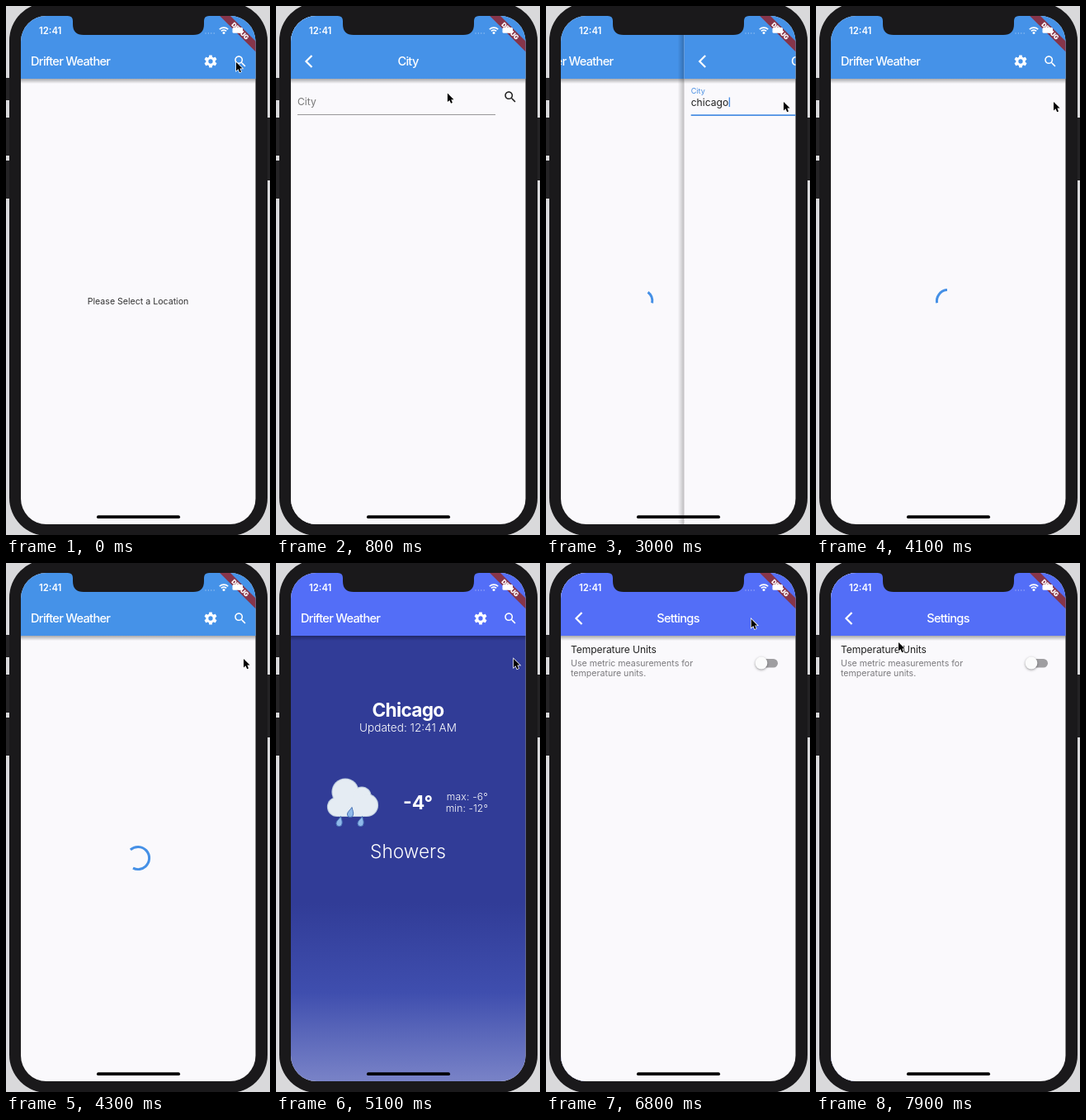
These frames come from a looping animation (320x640 px, 8000 ms). An HTML page with a canvas:

```html
<!DOCTYPE html>
<html lang="en">
<head>
<meta charset="utf-8">
<title>Weather app</title>
<style>
html, body { margin: 0; width: 100%; height: 100%; overflow: hidden; background: #d9d9db; }
canvas { display: block; width: 320px; height: 640px; }
</style>
</head>
<body>
<canvas id="stage" width="320" height="640"></canvas>
<script>
const c = document.getElementById('stage').getContext('2d');
const LOOP = 8000, STEP = 100, W = 284, TAU = Math.PI * 2;
const BODY = '#1a191b', PAPER = '#faf9fc', BLUE = [69, 146, 232], INDIGO = [83, 110, 247];
const LOADED = 4600, LOADING = 2867, FOCUS = 1000;
const TYPED = [1200, 1300, 1450, 1600, 1700, 1800, 2000];
// Pointer stops: time, x, y
const POINTER = [
  [0, 279, 68], [400, 279, 68], [950, 192, 114], [2150, 192, 114], [2600, 288, 116],
  [5300, 288, 116], [6000, 253, 67], [6700, 253, 67], [7700, 100, 96], [LOOP, 100, 96]
];
const SEARCH = new Path2D('M15.5 14h-.79l-.28-.27C15.41 12.59 16 11.11 16 9.5 16 5.91 13.09 3 9.5 3S3 5.91 3 9.5 5.91 16 9.5 16c1.61 0 3.09-.59 4.23-1.57l.27.28v.79l5 4.99L20.49 19l-4.99-5zm-6 0C7.01 14 5 11.99 5 9.5S7.01 5 9.5 5 14 7.01 14 9.5 11.99 14 9.5 14z');
const ARROW = new Path2D('M0 0V10.5L2.5 8.3 4.2 12.2 6 11.4 4.4 7.6H7.6Z');
const NOTCH = new Path2D('M75 11H246V12Q240 12 240 18V22Q240 35 227 35H94Q81 35 81 22V18Q81 12 75 12Z');
const DROP = new Path2D('M2 -6.5C3 -2 4 -1 3.6 2A3.6 3.6 0 0 1 -3.6 2C-3.5 -1 0 -3 2 -6.5Z');

const clamp = v => Math.max(0, Math.min(1, v));
const mix = (a, b, k) => a + (b - a) * k;

function bezier(x1, y1, x2, y2) {
  const at = (a, b, s) => 3 * a * s * (1 - s) ** 2 + 3 * b * s * s * (1 - s) + s ** 3;
  return x => {
    x = clamp(x);
    let lo = 0, hi = 1;
    for (let i = 0; i < 24; i++) {
      const mid = (lo + hi) / 2;
      if (at(x1, x2, mid) < x) lo = mid; else hi = mid;
    }
    return at(y1, y2, hi);
  };
}
const slideEase = bezier(.35, .91, .33, .97);
const strokeEase = bezier(.4, 0, .2, 1);
const slide = (t, start) => t < start ? 0 : slideEase((t - start) / 340);

function at(x, y, draw, turn = 0, scale = 1) {
  c.save();
  c.translate(x, y);
  c.rotate(turn);
  c.scale(scale, scale);
  draw();
  c.restore();
}

function rect(x, y, w, h, fill, r = 0) {
  c.fillStyle = fill;
  c.beginPath();
  c.roundRect(x, y, w, h, r);
  c.fill();
}

function disc(x, y, r, fill) {
  c.fillStyle = fill;
  c.beginPath();
  c.arc(x, y, r, 0, TAU);
  c.fill();
}

function arc(x, y, r, from, to, width, color) {
  c.strokeStyle = color;
  c.lineWidth = width;
  c.beginPath();
  c.arc(x, y, r, from, to);
  c.stroke();
}

function text(s, x, y, size, color, weight = 400, spacing = 0, align = 'left') {
  c.font = `${weight} ${size}px Inter, "Liberation Sans", sans-serif`;
  c.letterSpacing = spacing + 'px';
  c.textAlign = align;
  c.fillStyle = color;
  c.fillText(s, x, y);
}

function fade(x0, y0, x1, y1, ...stops) {
  const g = c.createLinearGradient(x0, y0, x1, y1);
  stops.forEach(([p, color]) => g.addColorStop(p, color));
  return g;
}

function searchIcon(x, y, color) {
  c.fillStyle = color;
  at(x - 9, y - 9, () => c.fill(SEARCH), 0, .757);
}

function gear(x, y) {
  arc(x, y, 4.2, 0, TAU, 3.1, '#fff');
  for (let i = 0; i < 6; i++)
    at(x, y, () => rect(-1.9, -7.6, 3.8, 3, '#fff', .6), i * TAU / 6);
}

function appBar(color) {
  rect(18, 88, W + 1, 6, fade(0, 88, 0, 94, [0, 'rgba(0,0,0,.32)'], [1, 'rgba(0,0,0,0)']));
  rect(18, 0, W + 1, 88, color);
}

function subPage(title, color) {
  rect(10, 0, 8, 640, fade(10, 0, 18, 0, [0, 'rgba(0,0,0,0)'], [1, 'rgba(0,0,0,.25)']));
  rect(18, 0, W + 1, 640, PAPER);
  appBar(color);
  c.strokeStyle = '#fff';
  c.lineWidth = 2.2;
  c.beginPath();
  c.moveTo(43.5, 60);
  c.lineTo(36.5, 67);
  c.lineTo(43.5, 74);
  c.stroke();
  text(title, 160, 72, 14.6, '#fff', 500, -.7, 'center');
}

function spinner(t) {
  const ms = (t - LOADING) * 1.24, cycle = ms / 1333 % 1;
  const head = strokeEase(cycle * 2) * .75, tail = strokeEase(cycle * 2 - 1) * .75;
  const start = (-.25 + tail + ms / 2222 + cycle / 4) * TAU;
  arc(160, 357, 13.6, start, start + Math.max(head - tail, .001) * TAU, 3, '#4590e6');
}

function cloud() {
  const puffs = [[84, 277, 16], [104, 282, 11], [74, 295, 11.5], [110, 293, 13.5]];
  for (const [grow, color] of [[.6, '#bccbdd'], [-.5, '#e5ecf3']]) {
    for (const [x, y, r] of puffs) disc(x, y, r + grow, color);
    rect(74, 284, 36, 22.5 + grow, color);
  }
  c.lineWidth = 1;
  c.strokeStyle = '#4a73b5';
  c.fillStyle = '#8fb9ea';
  for (const [x, y] of [[90, 302], [76.5, 313], [102.5, 313]])
    at(x, y, () => { c.fill(DROP); c.stroke(DROP); });
}

function weather() {
  rect(18, 88, W + 1, 552, fade(0, 88, 0, 627,
    [0, '#313c97'], [.6, '#313c97'], [.8, '#3f4eae'], [1, '#7983c7']));
  text('Chicago', 160, 186, 22.7, '#fff', 700, -.7, 'center');
  text('Updated: 12:41 AM', 160, 203.5, 13.6, '#fff', 300, 0, 'center');
  cloud();
  text('-4°', 154, 298, 23, '#fff', 700);
  text('max: -6°', 257, 287, 12.1, '#fff', 300, .2, 'right');
  text('min: -12°', 257, 301, 12.1, '#fff', 300, .1, 'right');
  text('Showers', 160, 357, 22.7, '#fff', 300, 0, 'center');
}

function home(t, color) {
  rect(18, 0, W + 1, 640, PAPER);
  if (t >= LOADED) weather();
  else if (t >= LOADING) spinner(t);
  else text('Please Select a Location', 160, 361, 10.6, '#333', 400, 0, 'center');
  appBar(color);
  text('Drifter Weather', 30, 72, 14.6, '#fff', 500, -.7);
  gear(248, 67);
  searchIcon(284, 67, '#fff');
}

function cityPage(t, color) {
  subPage('City', color);
  const k = clamp((t - FOCUS) / 160), on = k > 0;
  const accent = on ? '#4a8fe3' : '#777';
  text('City', 26, mix(120, 106, k), mix(12.1, 9.1, k), accent);
  const word = 'chicago'.slice(0, TYPED.filter(ms => ms <= t).length);
  text(word, 26, 120.5, 12.1, '#222');
  const idle = t - TYPED[6];
  if (on && (idle < 0 || idle % 1000 < 500))
    rect(26.5 + c.measureText(word).width, 110.5, 1.4, 11.5, '#4a8fe3');
  rect(26, 131.3, 240, on ? 1.6 : .8, accent);
  searchIcon(284, 110, '#222');
}

function settingsPage(color) {
  subPage('Settings', color);
  text('Temperature Units', 30, 109, 12.1, '#222', 400, -.1);
  text('Use metric measurements for', 30, 124.5, 10.6, '#7b7a7d');
  text('temperature units.', 30, 137, 10.6, '#7b7a7d');
  rect(256, 116, 25, 10.5, '#9f9ea1', 5.25);
  c.shadowColor = 'rgba(0,0,0,.4)';
  c.shadowBlur = 3;
  c.shadowOffsetY = 1;
  disc(261, 121, 7.4, '#fbfbfb');
  c.shadowColor = 'transparent';
}

function statusBar() {
  at(302, 12, () => {
    rect(-45, 21.2, 90, 9.1, '#86354a');
    text('DEBUG', 0, 28.5, 7.7, '#fff', 900, -.2, 'center');
  }, Math.PI / 4);
  text('12:41', 40, 33.7, 11.3, '#fff', 600, 0);
  for (let i = 0; i < 4; i++) disc(242 + i * 3.4, 33, .7, 'rgba(255,255,255,.45)');
  for (const r of [4.4, 7.4]) arc(264, 33.5, r, -TAU * 3 / 8, -TAU / 8, 1.7, '#fff');
  disc(264, 32.5, 1.5, '#fff');
  rect(274.5, 26, 12.5, 6.8, '#fff', 1.5);
  rect(110, 616.3, 101, 3.8, '#000', 2);
}

function phone() {
  rect(0, 0, 320, 640, '#d9d9db');
  for (const [y, h] of [[87, 27], [135, 46], [187, 46]]) rect(-3, y, 9, h, '#242325', 2);
  rect(315, 135, 9, 76, '#242325', 2);
  rect(4, -4, 313, 645, BODY, 46);
}

function pointer(t) {
  const i = POINTER.findIndex(p => p[0] > t);
  const [t0, x0, y0] = POINTER[i - 1], [t1, x1, y1] = POINTER[i];
  const u = (t - t0) / (t1 - t0), k = u * u * (3 - 2 * u);
  at(mix(x0, x1, k), mix(y0, y1, k), () => {
    c.lineWidth = 1.4;
    c.strokeStyle = '#fff';
    c.stroke(ARROW);
    c.fillStyle = '#000';
    c.fill(ARROW);
  });
}

function draw(t) {
  const tint = clamp((t - LOADED) / 160);
  const color = `rgb(${BLUE.map((v, i) => Math.round(mix(v, INDIGO[i], tint)))})`;
  const city = slide(t, 330) - slide(t, 2930), settings = slide(t, 6337);
  phone();
  c.save();
  c.beginPath();
  c.roundRect(18, 12, 284.5, 615, 31);
  c.clip();
  at(-W / 3 * (city + settings), 0, () => home(t, color));
  if (city > 0) at(W * (1 - city), 0, () => cityPage(t, color));
  if (settings > 0) at(W * (1 - settings), 0, () => settingsPage(color));
  statusBar();
  c.restore();
  c.fillStyle = BODY;
  c.fill(NOTCH);
  pointer(t);
}

function tick() {
  draw(Math.floor(performance.now() % LOOP / STEP) * STEP);
  requestAnimationFrame(tick);
}
tick();
</script>
</body>
</html>
```
